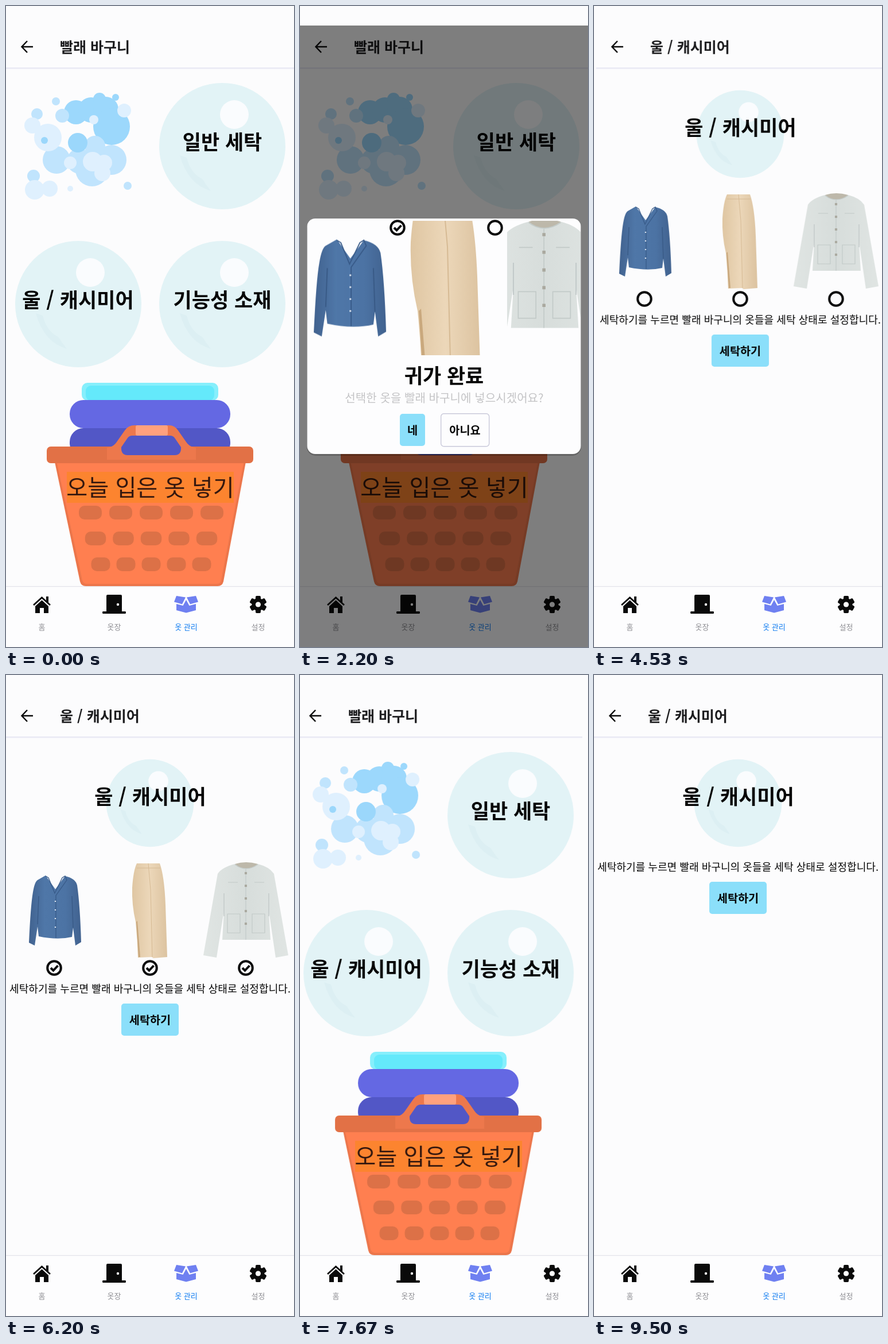
Write an HTML page that moves like this. It is 502 px wide and 1116 px high and loops after 9.57 s.

```html
<!DOCTYPE html>
<html lang="ko">
<head>
<meta charset="utf-8">
<title>빨래 바구니</title>
<style>
  html, body { margin: 0; width: 100%; height: 100%; overflow: hidden; background: #fcfcfd; }
  svg { display: block; width: 502px; height: 1116px; }
  text { font-family: "Noto Sans CJK KR", "Noto Sans CJK JP", "Noto Sans CJK", sans-serif; fill: #050505; text-anchor: middle; }
  .bar { font-size: 25px; font-weight: 700; text-anchor: start; fill: #1c1c1e; }
  .big { font-size: 35px; font-weight: 700; }
  .button { font-size: 19.7px; font-weight: 700; }
  .tab { font-size: 13px; fill: #8e8e93; }
  .line { fill: none; stroke: #0a0a0a; }
  #wool, #homeDialog, #washDialog { opacity: 0; }
</style>
</head>
<body>
<svg viewBox="0 0 502 1116">
  <defs>
    <linearGradient id="beige">
      <stop stop-color="#dfc6a2"/><stop offset=".5" stop-color="#ecd7b9"/><stop offset="1" stop-color="#dcc3a0"/>
    </linearGradient>
    <linearGradient id="tweed">
      <stop stop-color="#e0e5e3"/><stop offset=".5" stop-color="#d7dddb"/><stop offset="1" stop-color="#e0e5e3"/>
    </linearGradient>
    <linearGradient id="denim">
      <stop stop-color="#41628f"/><stop offset=".3" stop-color="#4f77a8"/><stop offset=".7" stop-color="#4c73a4"/><stop offset="1" stop-color="#41628f"/>
    </linearGradient>
    <g id="bubble">
      <circle r="110" fill="#e2f3f6"/>
      <circle cx="21" cy="-55" r="25" fill="#fafcfe"/>
      <path d="M-74 16Q-60 66 -20 78Q-28 68 -35 57Q-55 48 -62 20Z" fill="#dceff3"/>
    </g>
    <g id="topBar">
      <rect y="107" width="502" height="2.5" fill="#e9e9f4"/>
      <path d="M47 71H28M37 61L27.500 71L37 81" class="line" stroke-width="2.500"/>
    </g>
    <g id="ring"><circle r="11.800" class="line" stroke-width="4"/></g>
    <path id="tick" d="M-6 0L-1.500 4.500L6.500 -4" class="line" stroke-width="4"/>
    <g id="shirt">
      <path d="M69 349L86 373L103 350Q121 354 124 366Q129 400 131 465L121 471L117 440L115 456Q90 462 57 455L55 438L50 471L40 466Q43 400 47 378Q50 360 55 357Z" fill="url(#denim)"/>
      <path d="M69 350L74 353L85 380L98 353L103 350L106 357L87 384V458" fill="none" stroke="#385a88" stroke-width="1.300"/>
      <path d="M57 385L55 434M115 385L117 440" stroke="#395a86" stroke-width="1.400"/>
      <path d="M86 393V450" stroke="#dfe8f2" stroke-width="2.200" stroke-dasharray="2 13"/>
    </g>
    <g id="pants">
      <path d="M228 328H268Q276 350 278 400L281 491L257 493L254 491L230 492Q229 460 226 430Q219 400 220 370Q222 340 228 328Z" fill="url(#beige)"/>
      <path d="M228 336H269M248 328L252 374L255 491" fill="none" stroke="#d6ba94"/>
      <path d="M227 430L231 491H234L229 428Z" fill="#c9a87d"/>
    </g>
    <g id="jacket">
      <path d="M399 329Q418 340 439 329Q459 334 467 346L492 488L470 492L458 410L461 461H377L380 410L367 492L344 488L369 346Q376 335 399 329Z" fill="url(#tweed)"/>
      <path d="M399 329Q418 323 439 329Q418 345 399 329Z" fill="#bdb8aa"/>
      <path d="M399 330Q418 344 439 330M418 338V461M387 361H404M433 361H450M386 416H408V449H386ZM429 416H451V449H429Z" fill="none" stroke="#c2cac8" stroke-width="1.200"/>
      <path d="M380 380V420M458 380V420" stroke="#c3caca" stroke-width="1.500"/>
      <path d="M418 343V440" stroke="#aaa99f" stroke-width="4" stroke-dasharray="4 18"/>
    </g>
    <clipPath id="photos"><path d="M13 374H152V608H13ZM181 374H320V608H181ZM361 374H489V608H361Z"/></clipPath>
    <clipPath id="stage"><rect width="502" height="1010"/></clipPath>
  </defs>

  <g clip-path="url(#stage)">
    <g id="basket">
      <rect width="502" height="1010" fill="#fcfcfd"/>
      <use href="#topBar"/>
      <text class="bar" x="94" y="81">빨래 바구니</text>
      <g id="foam"></g>
      <use href="#bubble" x="377" y="244"/>
      <use href="#bubble" x="126" y="519"/>
      <use href="#bubble" x="377" y="519"/>
      <text class="big" x="377" y="250">일반 세탁</text>
      <text class="big" x="125.500" y="525">울 / 캐시미어</text>
      <text class="big" x="377" y="525">기능성 소재</text>

      <rect x="132" y="656" width="238" height="31" rx="10" fill="#86effc"/>
      <rect x="139" y="661" width="224" height="26" rx="9" fill="#64e9fb"/>
      <rect x="111" y="735" width="280" height="50" rx="24" fill="#5257c6"/>
      <rect x="111" y="686" width="280" height="49" rx="24" fill="#6468e3"/>
      <path d="M85 794H418L379 1002Q377 1010 369 1010H139Q131 1010 129 1002Z" fill="#ec764b"/>
      <path d="M89 796H414L375 1000Q374 1006 367 1006H141Q135 1006 133 1000Z" fill="#ff7f50"/>
      <rect x="71" y="767" width="360" height="29" rx="7" fill="#e27146"/>
      <path d="M176 769Q187 768 193 759L207 739Q213 730 224 730H284Q294 730 300 739L314 759Q320 768 331 769V790H176Z" fill="#ed784c"/>
      <path d="M201 768L212 752Q215 748 220 748H286Q291 748 294 752L305 768Q306 782 294 782H212Q200 782 201 768Z" fill="#5257c6"/>
      <rect x="226" y="730" width="56" height="18" rx="3" fill="#ffa17e"/>
      <g id="slots" fill="#dc7147"></g>
      <rect x="106" y="811" width="291" height="54" fill="#fc842f"/>
      <text x="251.500" y="853" font-size="40.200" style="fill:#35180f">오늘 입은 옷 넣기</text>
    </g>

    <g id="wool">
      <rect x="-60" width="562" height="1010" fill="#fcfcfd"/>
      <use href="#topBar"/>
      <text class="bar" x="94" y="81">울 / 캐시미어</text>
      <use href="#bubble" transform="translate(251 223) scale(.694)"/>
      <text class="big" x="251.500" y="225">울 / 캐시미어</text>
      <g id="clothes">
        <use href="#shirt"/><use href="#pants"/><use href="#jacket"/>
        <use href="#ring" x="84" y="510"/><use href="#ring" x="251" y="510"/><use href="#ring" x="418" y="510"/>
        <g id="woolTick1"><use href="#tick" x="84" y="510"/></g>
        <g id="woolTick2"><use href="#tick" x="251" y="510"/></g>
        <g id="woolTick3"><use href="#tick" x="418" y="510"/></g>
      </g>
      <g id="washForm">
        <text x="251" y="552.500" font-size="18.100">세탁하기를 누르면 빨래 바구니의 옷들을 세탁 상태로 설정합니다.</text>
        <rect x="201" y="572" width="100" height="56" rx="5" fill="#8bdffa"/>
        <text class="button" x="251" y="607.500">세탁하기</text>
      </g>
    </g>
  </g>

  <rect y="1010" width="502" height="106" fill="#fdfdfe"/>
  <rect y="1010" width="502" height="1.300" fill="#e4e4ea"/>
  <g fill="#0a0a0a">
    <path d="M48 1043L62.500 1030L77 1043" class="line" stroke-width="2.800"/>
    <path d="M70 1028H74V1039L70 1035ZM51 1045L62.500 1034.500L74 1045V1057H66V1048H59V1057H51Z"/>
    <path d="M175 1027Q175 1025 177 1025H200Q202 1025 202 1027V1054H208Q209 1054 209 1056T208 1058H169Q168 1058 168 1056T169 1054H175Z"/>
    <circle cx="195" cy="1042" r="2.200" fill="#fff"/>
    <path d="M297 1027L313 1029.500L307 1041.500L293 1037.500ZM331 1027L315 1029.500L321 1041.500L335 1037.500ZM297 1041L308.500 1044L314 1034L319.500 1044L331 1041V1052L314 1056.500L297 1052Z" fill="#6f80f1"/>
    <g id="gear"><circle cx="439.500" cy="1042" r="11"/></g>
    <circle cx="439.500" cy="1042" r="4.600" fill="#fdfdfe"/>
  </g>
  <text class="tab" x="62.500" y="1086">홈</text>
  <text class="tab" x="188.500" y="1086">옷장</text>
  <text class="tab" x="314" y="1086" style="fill:#107cf0;font-weight:500">옷 관리</text>
  <text class="tab" x="439.500" y="1086">설정</text>

  <g id="homeDialog">
    <rect y="34" width="502" height="1082" fill="#000" opacity=".5"/>
    <rect x="12" y="372" width="478" height="411" rx="15" fill="#000" opacity=".2"/>
    <rect x="12.500" y="370" width="477" height="410" rx="14" fill="#fdfdfe"/>
    <g clip-path="url(#photos)">
      <g id="photoRow">
        <use href="#shirt" transform="translate(-31.400 -77) scale(1.385)"/>
        <use href="#pants" transform="translate(-247 -329) scale(2)"/>
        <use href="#jacket" transform="translate(-160 -85) scale(1.400)"/>
      </g>
    </g>
    <use href="#ring" x="170" y="386"/><use href="#ring" x="340" y="386"/>
    <g id="homeTick1"><use href="#tick" x="170" y="386"/></g>
    <g id="homeTick2"><use href="#tick" x="340" y="386"/></g>
    <text class="big" x="251" y="657">귀가 완료</text>
    <text x="251.500" y="689.500" font-size="20.100" style="fill:#c4c4c6">선택한 옷을 빨래 바구니에 넣으시겠어요?</text>
    <g id="answers">
      <rect x="174" y="710" width="44" height="56" rx="5" fill="#8bdffa"/>
      <rect x="245.700" y="709.700" width="84" height="57" rx="5" fill="#fdfdfe" stroke="#c9c9da" stroke-width="1.400"/>
      <text class="button" x="196" y="745.500">네</text>
      <text class="button" x="287.500" y="745.500">아니요</text>
    </g>
  </g>

  <g id="washDialog">
    <rect y="34" width="502" height="1082" fill="#000" opacity=".5"/>
    <rect x="12.500" y="490" width="477" height="170" rx="14" fill="#fdfdfe"/>
    <text class="big" x="251" y="547">세탁하기</text>
    <use href="#answers" y="-122"/>
  </g>
</svg>
<script>
  const LOOP = 9570, SHIFT = 50.2;
  const byId = id => document.getElementById(id);

  function add(parent, tag, attrs) {
    const node = document.createElementNS("http://www.w3.org/2000/svg", tag);
    for (const key in attrs) node.setAttribute(key, attrs[key]);
    byId(parent).append(node);
  }

  // Foam: [x, y, radius] per shade, painted back to front.
  const foam = {
    "#9cd8fc": [[122, 185, 21], [148, 181, 22], [163, 162, 11], [174, 180, 22], [184, 210, 32], [191, 159, 6]],
    "#c0e4fd": [[54, 188, 10], [98, 191, 12], [88, 268, 24], [128, 270, 22], [150, 285, 29], [184, 268, 26], [155, 244, 18], [48, 296, 11], [212, 313, 7], [87, 166, 7]],
    "#dff0fe": [[46, 208, 14], [73, 229, 24], [206, 182, 12], [153, 198, 8], [112, 273, 11], [151, 271, 17], [171, 273, 14], [168, 291, 14], [50, 320, 17], [76, 318, 14], [112, 318, 5]],
    "#9bd7fb": [[125, 238, 17], [67, 234, 6]]
  };
  for (const fill in foam)
    for (const [cx, cy, r] of foam[fill]) add("foam", "circle", { cx, cy, r, fill });

  for (let row = 0; row < 3; row++)
    for (let col = -2; col <= 2; col++) {
      const width = 40 - 3.5 * row;
      add("slots", "rect", { x: 253 + col * (53 - 4.5 * row) - width / 2, y: 870 + 45 * row, width, height: 24, rx: 10 });
    }

  for (let i = 0; i < 6; i++)
    add("gear", "rect", { x: 435, y: 1027, width: 9, height: 9, rx: 2, transform: `rotate(${60 * i} 439.5 1042)` });

  // Keys are [time in ms, value, easing to the next key].
  function track(id, prop, ...keys) {
    keys = [[0, keys[0][1]], ...keys, [LOOP, keys.at(-1)[1]]];
    byId(id).animate(
      keys.map(([ms, value, easing = "linear"]) => ({ offset: ms / LOOP, [prop]: value, easing })),
      { duration: LOOP, iterations: Infinity });
  }
  const fade = (id, ...keys) => track(id, "opacity", ...keys);
  const showAt = (id, ms) => fade(id, [ms, 0], [ms, 1]);
  const moveX = x => `translate(${x}px, 0px)`;

  // Fast start with a very long settle, in two curve pieces.
  const slide = (ms, from, to) => [
    [ms, moveX(from), "cubic-bezier(.3, 0, .8, .15)"],
    [ms + 75, moveX(from + (to - from) * .4), "cubic-bezier(.05, .7, .1, 1)"],
    [ms + 450, moveX(to)]
  ];
  const screenMoves = offset => [
    ...slide(4340, offset, offset - SHIFT),
    ...slide(7550, offset - SHIFT, offset),
    ...slide(8770, offset, offset - SHIFT)
  ];

  track("basket", "transform", ...screenMoves(0));
  track("wool", "transform", ...screenMoves(SHIFT));
  fade("wool", [4390, 0], [4473, 1], [7585, 1], [7668, 0], [8820, 0], [8903, 1]);

  fade("homeDialog", [1170, 0], [1350, 1], [3370, 1], [3460, 0]);
  fade("photoRow", [1300, 0], [1540, 1]);
  showAt("homeTick1", 1970);
  showAt("homeTick2", 2400);

  showAt("woolTick1", 5570);
  showAt("woolTick2", 5970);
  showAt("woolTick3", 6200);
  fade("washDialog", [6400, 0], [6600, 1], [7200, 1], [7310, 0]);

  fade("clothes", [8300, 1], [8300, 0]);
  track("washForm", "transform", [8300, "translate(0px, 0px)"], [8300, "translate(0px, -212px)"]);
</script>
</body>
</html>
```
